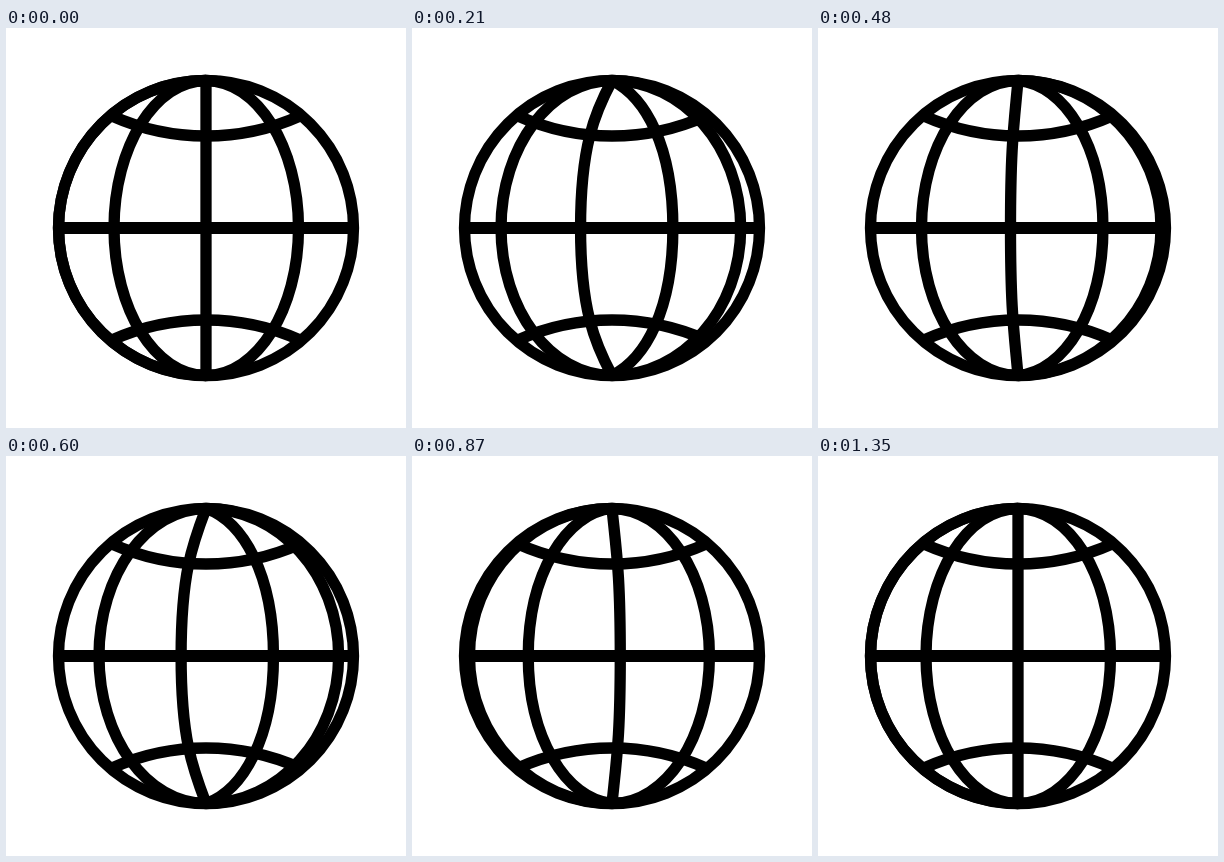
Animation of 400x400 px, one loop 3.41 s. Source, as an HTML page with a canvas:

```html
<!DOCTYPE html>
<html lang="en">
<head>
<meta charset="utf-8">
<title>Spinning globe</title>
<style>
  html, body { margin: 0; width: 100%; height: 100%; overflow: hidden; background: #fff; }
  canvas { display: block; width: 400px; height: 400px; }
</style>
</head>
<body>
<canvas id="stage"></canvas>
<script>
const LOOP = 3410, SPIN = 1350, STEP = 30, TURNS = 7;
const C = 200, R = 147.5, LINE = 11.3;
const SIDE = 92, KAPPA = 0.5523;
const STOPS = [-R, -SIDE, 0, SIDE + 0.5, R];   // meridian offsets at the equator
const X1 = 0.085, X2 = 0.42;                   // easing handles

const canvas = document.getElementById('stage');
const ctx = canvas.getContext('2d');
const dpr = window.devicePixelRatio || 1;
canvas.width = canvas.height = 400 * dpr;
ctx.scale(dpr, dpr);

// Cubic bezier easing (X1, 0, X2, 1), solved by bisection
function ease(x) {
  if (x <= 0) return 0;
  if (x >= 1) return 1;
  let lo = 0, hi = 1;
  for (let i = 0; i < 30; i++) {
    const s = (lo + hi) / 2, q = 1 - s;
    const bx = 3 * X1 * s * q * q + 3 * X2 * s * s * q + s * s * s;
    if (bx < x) lo = s; else hi = s;
  }
  return lo * lo * (3 - 2 * lo);
}

function stroke(trace, width = LINE) {
  ctx.lineWidth = width;
  ctx.beginPath();
  trace();
  ctx.stroke();
}

// Half ellipse whose pole handles tilt downwards as it straightens into a line
function meridian(dx) {
  const straight = Math.max(0, 1 - Math.abs(dx) / SIDE);
  const poleY = R - straight * R / 3;
  const x = C + dx, poleX = C + dx * KAPPA, sideY = R * KAPPA;
  stroke(() => {
    ctx.moveTo(C, C - R);
    ctx.bezierCurveTo(poleX, C - poleY, x, C - sideY, x, C);
    ctx.bezierCurveTo(x, C + sideY, poleX, C + poleY, C, C + R);
  });
}

// Arc bulging towards the equator; side is -1 for north, 1 for south
function parallel(side) {
  const half = 94, sag = 20;
  const r = (half * half + sag * sag) / (2 * sag);
  const a = Math.asin(half / r), mid = -side * Math.PI / 2;
  stroke(() => ctx.arc(C, C + side * (92 + r), r, mid - a, mid + a));
}

function draw(t) {
  const turn = ease(Math.floor(t / STEP) * STEP / SPIN) * TURNS;
  const p = turn % 1;
  ctx.fillStyle = '#fff';
  ctx.fillRect(0, 0, 400, 400);
  ctx.strokeStyle = '#000';
  stroke(() => ctx.arc(C, C, R, 0, 2 * Math.PI));
  stroke(() => { ctx.moveTo(C - R, C); ctx.lineTo(C + R, C); }, 12);
  parallel(-1);
  parallel(1);
  for (let i = 0; i < 4; i++) {
    meridian(STOPS[i] + (STOPS[i + 1] - STOPS[i]) * p);
  }
}

const start = performance.now();
function tick() {
  draw((performance.now() - start) % LOOP);
  requestAnimationFrame(tick);
}
tick();
</script>
</body>
</html>
```
